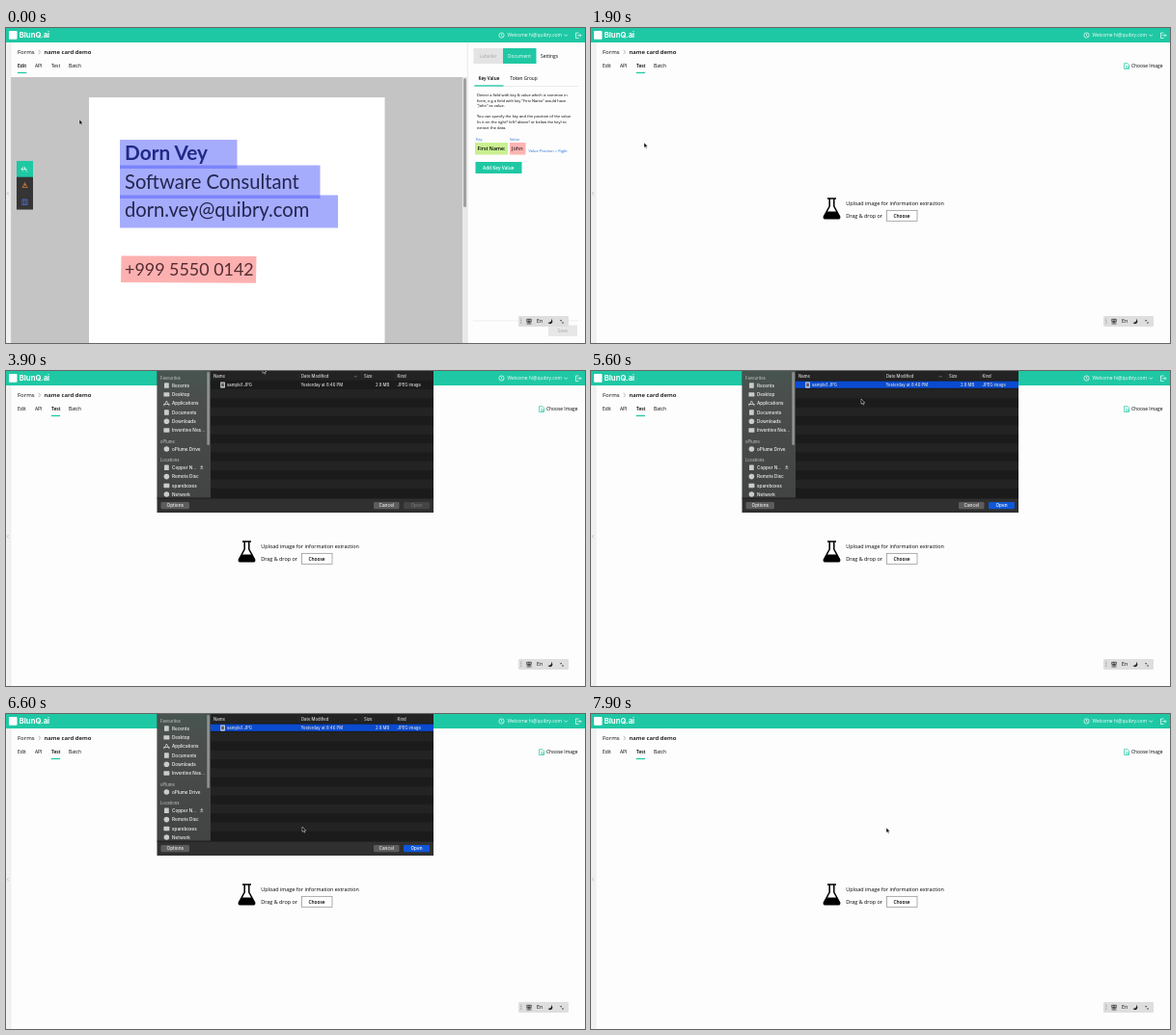
Write an HTML page that moves like this. It is 600 px wide and 327 px high and loops after 8000 ms.

```html
<!DOCTYPE html>
<html lang="en">
<head>
<meta charset="utf-8">
<title>Name card demo</title>
<style>
html, body { margin: 0; width: 100%; height: 100%; overflow: hidden; background: #fdfdfd; }
svg { display: block; width: 600px; height: 327px; }
text { font-family: "Open Sans", "Noto Sans", sans-serif; font-size: 4.9px; fill: #000; white-space: pre; }
.logo { font: 700 7.7px Inter, sans-serif; fill: #fff; }
.crumb { font-size: 6px; }
.b { font-weight: 600; }
.w { fill: #fff; }
.off { fill: #a9a9a9; }
.blue { fill: #2873d8; font-size: 4px; }
.small { font-size: 4px; }
.big { font-size: 5.42px; font-weight: 500; }
.card text, .photo text { font-family: Lato, "Noto Sans CJK TC", "Noto Sans CJK SC", sans-serif; }
.card text { font-size: 20.2px; fill: #23264f; }
.photo text { font-size: 9.6px; fill: #4a4a50; }
.photo .addr { font-size: 5.8px; font-weight: 700; fill: #333336; }
.photo .cjk { font-family: "Noto Sans CJK TC", "Noto Sans CJK SC", "Noto Sans CJK", sans-serif; font-size: 6.4px; font-weight: 700; fill: #2b2b2e; }
.dialog text { font-family: Inter, Roboto, sans-serif; font-size: 4.25px; font-weight: 500; fill: #dcdcdc; }
.dialog .side { font-size: 4.65px; fill: #f4f4f4; }
.dialog .group { font-size: 4.2px; fill: #b4b7b6; }
.dialog .btn { font-size: 4.7px; fill: #f0f0f0; text-anchor: middle; }
.line { fill: none; stroke-width: .7; }
</style>
</head>
<body>
<svg viewBox="0 0 600 327">
  <defs>
    <linearGradient id="sideFill" x1="0" y1="0" x2="0" y2="1">
      <stop offset="0" stop-color="#46564f"/><stop offset=".25" stop-color="#4b4e4d"/><stop offset="1" stop-color="#424343"/>
    </linearGradient>
    <linearGradient id="woodFill" x1="0" y1="0" x2="0" y2="1">
      <stop offset="0" stop-color="#202123"/><stop offset=".35" stop-color="#252423"/>
      <stop offset=".6" stop-color="#191614"/><stop offset="1" stop-color="#1d1612"/>
    </linearGradient>
    <radialGradient id="sheen">
      <stop offset="0" stop-color="#777" stop-opacity=".55"/><stop offset="1" stop-color="#777" stop-opacity="0"/>
    </radialGradient>
    <linearGradient id="paperFill" x1="0" y1="0" x2=".3" y2="1">
      <stop offset="0" stop-color="#d3d1d1"/><stop offset="1" stop-color="#dbd9d8"/>
    </linearGradient>
    <filter id="soft" x="-20%" y="-20%" width="140%" height="140%"><feGaussianBlur stdDeviation="5"/></filter>
    <filter id="blur" x="-20%" y="-80%" width="140%" height="260%"><feGaussianBlur stdDeviation="1.6"/></filter>
    <clipPath id="photoClip"><rect x="177" y="-8" width="244.5" height="319.5"/></clipPath>
  </defs>

  <rect width="600" height="327" fill="#fdfdfd"/>

  <g id="edit">
    <rect x="5" y="51" width="473" height="276" fill="#c4c4c4"/>
    <rect x="86" y="72" width="306.5" height="255" fill="#fff"/>
    <rect x="473" y="51" width="5" height="276" fill="#e9e9e9"/>
    <rect x="474" y="52" width="3" height="134" rx="1.5" fill="#a0a0a0"/>
    <g class="card">
      <g fill="#5560fa" fill-opacity=".52">
        <rect x="118" y="116" width="121.5" height="30"/>
        <rect x="118" y="142.5" width="207.5" height="34.5"/>
        <rect x="118" y="173.5" width="226" height="34"/>
      </g>
      <path d="M119.5 236.5L259.5 237L259 264.8L119 264Z" fill="#fcb1b0"/>
      <text x="123" y="136.5" style="font-weight:700;font-size:20.8px;fill:#1f2a86">Dorn Vey</text>
      <text x="123" y="166.5">Software Consultant</text>
      <text x="123" y="196">dorn.vey@quibry.com</text>
      <text x="123" y="256.5" style="font-size:17.9px;fill:#542c33">+999 5550 0142</text>
    </g>
    <rect x="11" y="138" width="17" height="50.5" fill="#353535"/>
    <rect x="11" y="138" width="17" height="16.7" fill="#1fc8a4"/>
    <path class="line" stroke="#fff" d="M16 146.5l2-2.5M16 146.5l2 2.2M16 146.5h5.5M19.5 144v2.5M22 149.5l-2.5-3"/>
    <path class="line" stroke="#e2843d" d="M17 165.5l2.5-5 2.5 5zM19.5 162v2"/>
    <path class="line" stroke="#5470e0" d="M16.8 178h5.4v5.5h-5.4zM18.6 178v5.5M20.4 178v5.5"/>

    <rect x="478" y="15" width="122" height="312" fill="#fdfdfd"/>
    <path d="M478.3 15V327" stroke="#dcdcdc" stroke-width=".6"/>
    <rect x="484.5" y="21" width="30.5" height="16" fill="#e4e4e4"/>
    <rect x="515" y="21" width="34.5" height="16" fill="#1fc8a4"/>
    <text class="off" x="490.5" y="30.8">Labeller</text>
    <text class="w" x="520" y="30.8">Document</text>
    <text x="554" y="30.8">Settings</text>
    <text class="b" x="489.5" y="53.7" style="font-size:4.7px">Key Value</text>
    <text x="522.5" y="53.7" style="font-size:4.7px">Token Group</text>
    <path d="M484 60.5H593" stroke="#e2e2e2" stroke-width=".6"/>
    <rect x="485.5" y="59.3" width="30" height="1.3" fill="#1fc8a4"/>
    <g id="help"></g>
    <text class="blue" x="487" y="116.7">Key</text>
    <text class="blue" x="522" y="116.7">Value</text>
    <rect x="486" y="119" width="34" height="12.5" fill="#c9f090"/>
    <rect x="522" y="119" width="16.5" height="12.5" fill="#fdb4b2"/>
    <text class="b" x="488.5" y="127.2" style="font-size:5.2px">First Name:</text>
    <text x="524" y="127.2" style="font-size:5.6px">John</text>
    <text class="blue" x="541.5" y="129.4">Value Position = Right</text>
    <rect x="486.5" y="139" width="48" height="12" fill="#1fc8a4"/>
    <text class="b w" x="494" y="146.8" style="font-size:4.75px">Add Key Value</text>
    <path d="M484 304H593" stroke="#e2e2e2" stroke-width=".6"/>
    <rect x="562" y="308.5" width="30" height="11.5" fill="#e7e7e7"/>
    <text class="off" x="571.5" y="316.3">Save</text>
  </g>

  <g id="test">
    <path class="line" stroke="#1fc8a4" d="M552.5 36.7h3.600l1.400 1.500v4.300h-5zM554 39.8h2.500M554 41.2h4"/>
    <text x="560" y="41.3">Choose Image</text>
    <path d="M245 177h9M247.200 177v8l-5.700 10.5q-.7 2.300 1.600 2.300h12.800q2.300 0 1.600-2.300L251.800 185v-8" fill="none" stroke="#000" stroke-width="1.5"/>
    <path d="M244.300 190.5h10.400l3 5.200q.5 1.900-1.500 1.900h-13.400q-2 0-1.600-1.900z"/>
    <text class="big" x="264.3" y="184.2">Upload image for information extraction</text>
    <text class="big" x="264.3" y="196.8">Drag &amp; drop or</text>
    <rect x="306.5" y="189.3" width="31.5" height="11" fill="#fff" stroke="#8b8b8b" stroke-width=".7"/>
    <text class="b" x="313.5" y="196.7" style="font-size:4.8px">Choose</text>
  </g>

  <g>
    <rect width="600" height="15" fill="#1fc8a4"/>
    <rect x="3" y="3" width="8.5" height="8.8" rx="1" fill="#fff"/>
    <text class="logo" x="13.7" y="10.3">BlunQ.ai</text>
    <circle class="line" cx="513.5" cy="7.5" r="2.6" stroke="#fff"/>
    <path class="line" stroke="#fff" d="M513.5 6v1.8l1 .7M578.5 6.700l1.700 1.700 1.700-1.700M593.5 5h-3v5.500h3M592 7.700h4M594.500 6.200l1.500 1.500-1.500 1.500"/>
    <text class="w" x="519.5" y="9.3">Welcome hi@quibry.com</text>
    <rect y="15" width="5" height="312" fill="#f1f1f1"/>
    <path d="M5 15V327" stroke="#e2e2e2" stroke-width=".5"/>
    <path d="M2.600 170l-1.200 1.700 1.200 1.700" fill="none" stroke="#999" stroke-width=".5"/>
    <text class="crumb" x="12" y="27.2">Forms</text>
    <path class="line" stroke="#999" d="M33.700 22.800l1.900 2.200-1.900 2.200"/>
    <text class="crumb b" x="39.5" y="27.2">name card demo</text>
    <text id="tabEdit" x="12" y="41.3">Edit</text>
    <text x="30" y="41.3">API</text>
    <text id="tabTest" x="47" y="41.3">Test</text>
    <text x="65" y="41.3">Batch</text>
    <rect id="mark" x="12" y="45.8" width="9.3" height="1.3" fill="#1fc8a4"/>
  </g>

  <g>
    <rect x="531" y="299" width="52" height="11" rx="1.2" fill="#dedede"/>
    <path d="M533.8 301.5v6" stroke="#777" stroke-width=".8" stroke-dasharray=".8 .8"/>
    <path class="line" stroke="#222" d="M539.700 302.300h4.600v2h-4.600zM542 302v4.600M539.500 305.200h5M539.500 307h5"/>
    <text x="550" y="306.4" style="font-size:5.2px">En</text>
    <path d="M565 301.800q1 3.800-3.500 4.200q1.800 1.900 4 .6q2-1.700-.5-4.800z" fill="#222"/>
    <path d="M574.500 303h1.200v1.200h-1.200zM576.500 305.300h1v1.500h-1z" fill="#222"/>
  </g>

  <g id="dialog" class="dialog">
    <rect x="156.5" y="-6" width="286.5" height="153" fill="#303030"/>
    <rect x="157" y="-6" width="55" height="138" fill="url(#sideFill)"/>
    <rect x="208.3" y="1" width="2.6" height="76" rx="1.3" fill="#8f9291"/>
    <g id="sidebar"></g>
    <rect x="212" y="-6" width="231" height="138" fill="#1b1b1b"/>
    <g id="rows"></g>
    <rect x="212" y="-6" width="231" height="15.6" fill="#232323"/>
    <path d="M304 1v8M369 1v8M403.5 1v8" stroke="#353535" stroke-width=".5"/>
    <path d="M361 6.500l1.300-1.500 1.300 1.500" fill="none" stroke="#aaa" stroke-width=".5"/>
    <text x="215" y="7.3">Name</text><text x="306" y="7.3">Date Modified</text>
    <text x="371" y="7.3">Size</text><text x="405.5" y="7.3">Kind</text>
    <rect id="pick" x="212" y="10.6" width="231" height="7.2"/>
    <rect x="222.3" y="11.5" width="4.5" height="6" fill="#e6e6e6"/>
    <rect x="223.2" y="12.5" width="2.7" height="3.8" fill="#565a66"/>
    <text x="229" y="16">sample1.JPG</text>
    <text x="305.5" y="16">Yesterday at 8:46 PM</text>
    <text x="383" y="16">2.8 MB</text><text x="405.5" y="16">JPEG image</text>
    <path d="M156.500 132H443" stroke="#111" stroke-width=".7"/>
    <rect x="160.5" y="136" width="29.5" height="7.3" rx="1.3" fill="#5c5c5c"/>
    <rect x="381" y="136" width="26.5" height="7.3" rx="1.3" fill="#5c5c5c"/>
    <rect id="openBtn" x="412" y="136" width="27" height="7.3" rx="1.3"/>
    <text class="btn" x="175.3" y="141.4">Options</text>
    <text class="btn" x="394.3" y="141.4">Cancel</text>
    <text class="btn" id="openText" x="425.5" y="141.4">Open</text>
    <rect id="dim" x="156.5" y="-6" width="286.5" height="153" fill="#0c0c0c"/>
  </g>

  <g id="photo" class="photo">
    <rect x="179" y="4" width="240.5" height="314" fill="#000" opacity=".6" filter="url(#soft)"/>
    <g clip-path="url(#photoClip)">
      <rect x="177" y="-8" width="244.5" height="320" fill="url(#woodFill)"/>
      <ellipse cx="205" cy="65" rx="105" ry="85" fill="url(#sheen)"/>
      <g id="grain"></g>
      <path d="M226 288L368 298L374 303L224 294Z" fill="#000" opacity=".6" filter="url(#blur)"/>
      <path d="M226 39L367.500 26L375 297.500L224.500 285.500Z" fill="url(#paperFill)"/>
    </g>
    <rect x="177" y="-8" width="244.5" height="319.7" fill="none" stroke="#666" stroke-width=".5"/>
    <text transform="translate(239 65.2) rotate(-3.5)" style="font-size:9.4px;font-weight:700;fill:#30477f">Tobric Fenn</text>
    <text transform="translate(238.5 79.5) rotate(-3)">Developer Evangelist</text>
    <text transform="translate(238.5 93.3) rotate(-2.6)" style="font-size:9.9px">tobricfenn@quibry.com</text>
    <rect x="240" y="101.5" width="62" height="5" fill="#e6e7b4" opacity=".8" filter="url(#blur)" transform="rotate(-2 240 104)"/>
    <text transform="translate(238.5 122.3) rotate(-1.6)" style="font-size:8.3px">+999 5550 0142</text>
    <text x="238.5" y="190.5" style="font-size:8.3px">HK</text>
    <text class="cjk" x="256" y="189.8">墨島禾石灣禾雲街27號禾峰工廠大廈</text>
    <text class="cjk" x="256" y="198">30樓D室</text>
    <text class="addr" x="256" y="206">Room D, 30/F, Tall Maple Factory</text>
    <text class="addr" x="256" y="213.6">Building, 27 Fennow Lark Street,</text>
    <text class="addr" x="256" y="221">Fennow Pel Bay, Mork Isle</text>
    <text x="238.5" y="244.5" style="font-size:8.3px">TW</text>
    <g transform="rotate(1.3 256 245)">
      <text class="cjk" x="256" y="244.8">墨北市禾山區禾春路 527 號 6 - 7 樓</text>
      <text class="addr" x="256" y="252.5">Floor 6-7, No. 527, Hechurn Rd,</text>
      <text class="addr" x="256" y="260">Hoshane District</text>
    </g>
  </g>

  <path id="cursor" d="M0 0V5.300L1.250 4.200L2.100 6.100L3 5.700L2.200 3.850H3.850Z" fill="#000" stroke="#fff" stroke-width=".45"/>
</svg>
<script>
const $ = id => document.getElementById(id);
const LOOP = 8000, STEP = 100;

function add(parent, tag, attrs, label) {
  const el = document.createElementNS('http://www.w3.org/2000/svg', tag);
  for (const k in attrs) el.setAttribute(k, attrs[k]);
  if (label) el.textContent = label;
  parent.appendChild(el);
}

[['Detect a field with key & value which is common in', 70.8],
 ['form, e.g a field with key "First Name" would have', 76.6],
 ['"John" as value.', 82.4],
 ['You can specify the key and the position of the value', 93.2],
 ['(is it on the right? left? above? or below the key) to', 98.9],
 ['extract the data.', 104.6]
].forEach(([s, y]) => add($('help'), 'text', { x: 488, y, class: 'small' }, s));

// Sidebar: label, centre line, icon kind ('' marks a group heading)
[['Favourites', 7, ''], ['Recents', 15, 'box'], ['Desktop', 24.4, 'wide'], ['Applications', 33.7, 'tri'],
 ['Documents', 43, 'box'], ['Downloads', 52.2, 'disc'], ['Inventive Nes...', 61.5, 'wide'],
 ['oPlume', 73, ''], ['oPlume Drive', 81, 'disc'], ['Locations', 92, ''], ['Copper N...', 100.2, 'box'],
 ['Remote Disc', 109.6, 'disc'], ['spareboxes', 119, 'wide'], ['Network', 128, 'disc']
].forEach(([s, y, kind]) => {
  const g = $('sidebar'), fill = '#c9cccb';
  add(g, 'text', { x: kind ? 172 : 160, y: y + 1.7, class: kind ? 'side' : 'group' }, s);
  if (kind === 'box') add(g, 'rect', { x: 164, y: y - 2.8, width: 4.8, height: 5.6, rx: .6, fill });
  if (kind === 'wide') add(g, 'rect', { x: 163.4, y: y - 2.2, width: 6, height: 4.4, rx: .6, fill });
  if (kind === 'disc') add(g, 'circle', { cx: 166.4, cy: y, r: 2.8, fill });
  if (kind === 'tri') add(g, 'path', { d: `M163.6 ${y + 2.5}L166.4 ${y - 2.7}L169.2 ${y + 2.5}M163.2 ${y + .8}h6.4`, fill: 'none', stroke: fill, 'stroke-width': .9 });
});
add($('sidebar'), 'path', { d: 'M201.3 99.8h3l-1.5-1.7zM201.3 100.7h3v.7h-3z', fill: '#d5d5d5' });

for (let i = 0; i < 13; i += 2)
  add($('rows'), 'rect', { x: 212, y: 19 + i * 9.35, width: 231, height: Math.min(9.35, 113 - i * 9.35), fill: '#232323' });

// Wood grain: light streaks fade towards the bottom
let seed = 7;
const rand = () => (seed = seed * 16807 % 2147483647) / 2147483647;
for (let i = 0; i < 260; i++) {
  const x = 150 + rand() * 250, y = rand() * 345 - 10, w = 15 + rand() * 55, light = rand() < .4;
  add($('grain'), 'path', {
    d: `M${x} ${y}q${w / 2} ${-w * .08} ${w} ${-w * .2}`, fill: 'none',
    stroke: light ? '#85827f' : '#08090a', 'stroke-width': .4 + rand() * .7,
    opacity: light ? Math.max(.08, .4 - y / 500) : .45
  });
}

// Step tables: time, then values
const cursorPath = [
  [0, 76, 95], [200, 76, 95], [800, 51, 39], [1200, 51, 39], [1800, 55, 119], [2000, 55, 119],
  [2700, 321, 194], [3200, 321, 194], [3800, 266, -3], [3900, 266, -3], [4300, 284, 13],
  [4800, 284, 13], [5300, 280, 29], [5600, 280, 29], [5900, 307, 117], [7000, 307, 117], [7400, 306, 118]
];
const sheetY = [[3100, -165], [3500, 0], [7400, 0], [7700, -165]];
const preview = [[5600, 0], [5900, 1], [6200, 1], [6500, 0]];

function at(table, t) {
  const i = table.findIndex(k => k[0] > t);
  if (i === 0) return table[0].slice(1);
  if (i < 0) return table[table.length - 1].slice(1);
  const a = table[i - 1], b = table[i], u = (t - a[0]) / (b[0] - a[0]), e = u * u * (3 - 2 * u);
  return a.slice(1).map((v, n) => v + (b[n + 1] - v) * e);
}
const show = (id, on) => $(id).style.display = on ? '' : 'none';

function draw(t) {
  const test = t >= 1100, picked = t >= 4400, [zoom] = at(preview, t), [drop] = at(sheetY, t);
  show('edit', !test);
  show('test', test);
  $('tabEdit').style.fontWeight = test ? 400 : 600;
  $('tabTest').style.fontWeight = test ? 600 : 400;
  $('mark').setAttribute('x', test ? 46.8 : 12);

  show('dialog', drop > -160);
  $('dialog').setAttribute('transform', `translate(0 ${drop})`);
  show('pick', picked);
  const active = picked && zoom === 0;
  $('pick').setAttribute('fill', active ? '#0a4bd0' : '#464646');
  $('openBtn').setAttribute('fill', active ? '#0f57d9' : '#444');
  $('openText').style.fill = picked ? '#fff' : '#777';
  $('dim').setAttribute('opacity', zoom * .5);

  show('photo', zoom > 0);
  const s = .03 + .97 * zoom, mix = (a, b) => a + (b - a) * zoom;
  $('photo').setAttribute('transform', `translate(${mix(224.5, 299)} ${mix(14.5, 152)}) scale(${s}) translate(-299 -152)`);
  $('photo').setAttribute('opacity', Math.min(1, zoom * 1.5));

  const [x, y] = at(cursorPath, t);
  $('cursor').setAttribute('transform', `translate(${x} ${y})`);
}

const start = performance.now();
function tick() {
  const t = (performance.now() - start) % LOOP;
  draw(Math.floor(t / STEP) * STEP);
  requestAnimationFrame(tick);
}
tick();
</script>
</body>
</html>
```
